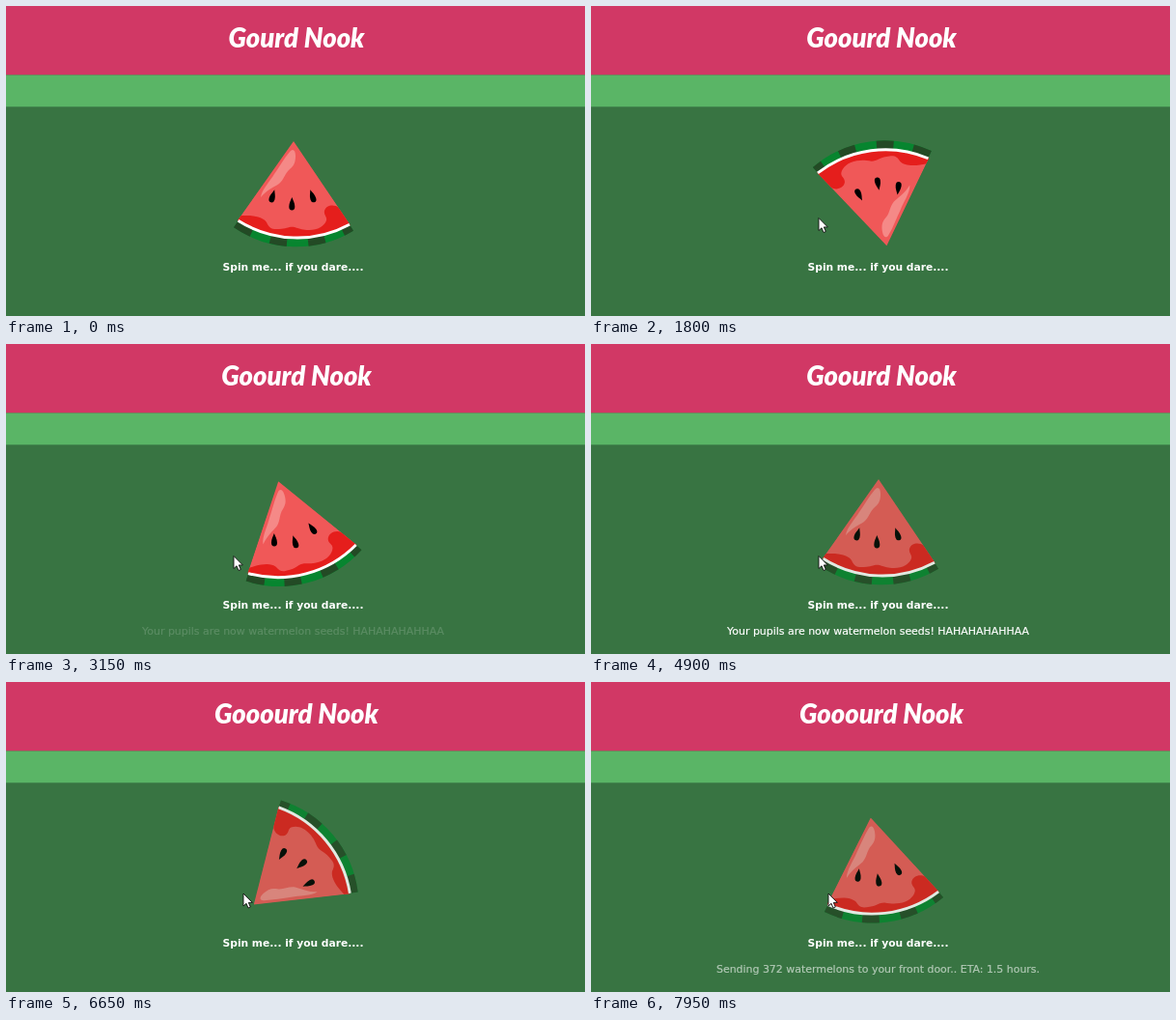
An HTML page that plays this animation: 600x321 px, repeating every 8000 ms.

```html
<!DOCTYPE html>
<html lang="en">
<head>
<meta charset="utf-8">
<title>Spin the slice</title>
<style>
html, body { margin: 0; width: 100%; height: 100%; overflow: hidden; background: #387442; }
svg { display: block; width: 100%; height: 100%; }
text { fill: #fff; text-anchor: middle; font: 10.95px Verdana, "DejaVu Sans", sans-serif; }
#title { font: italic 900 27.4px Lato, sans-serif; }
#label { font-weight: bold; font-size: 10.7px; }
#fortune { stroke: #fff; stroke-width: .2; }
</style>
</head>
<body>
<svg viewBox="0 0 600 321">
  <defs>
    <clipPath id="wedge"><path d="M298 140L240 222A114 114 0 0 0 356.5 226.5Z"/></clipPath>
    <path id="seed" d="M0-7C1-4 3-1 3 2.7A3 3.8 0 0 1-3 2.7C-3-1-1-4 0-7Z"/>
  </defs>
  <rect width="600" height="71.5" fill="#d13865"/>
  <rect y="71.5" width="600" height="32.8" fill="#5ab566"/>
  <text id="title" x="301" y="42.7"></text>

  <g id="slice">
    <g fill="none" stroke-width="9">
      <path d="M238.5 225.5A110 110 0 0 0 357.7 229" stroke="#07852f"/>
      <path d="M238.5 225.5A110 110 0 0 0 357.7 229" stroke="#234a25"
            stroke-dasharray="18.5 20.5 17.5 22 17.5 20 20 90"/>
    </g>
    <g clip-path="url(#wedge)">
      <path d="M298 139L230 236L300 250L366 240Z" fill="#f05858"/>
      <path d="M236 217H250C258 217 267 219 270 224C273 231 276 231 283 231C291 231 293 228 299 229C305 231 308 232 314 232C323 232 330 228 332 222C333 218 329 217 330 212C332 206 340 205 345 209L370 214V250H230Z" fill="#e51e1c"/>
      <path d="M294 151C297 147 300 149 300 155C300 161 299 165 294 169C289 173 288 180 283 184C277 188 271 190 264 198C265 190 274 181 278 174C283 167 288 158 294 151Z" fill="#f58987"/>
    </g>
    <path d="M240.6 222.2A114 114 0 0 0 356 226.2" fill="none" stroke="#fff" stroke-width="2.9"/>
    <use href="#seed" transform="translate(276.3 197) rotate(16)"/>
    <use href="#seed" transform="translate(296.3 205)"/>
    <use href="#seed" transform="translate(317.5 197) rotate(-18)"/>
  </g>

  <text id="label" x="297.5" y="274">Spin me... if you dare....</text>
  <text id="fortune" x="297.5" y="301"></text>
  <path id="cursor" d="M0 0V13L3 10.3L5 15L7.3 14L5.3 9.4H9.3Z" fill="#fff" stroke="#111" stroke-width=".9"/>
</svg>
<script>
const LOOP = 8000, SPIN = 3000, CLICKS = [960, 5547], REVEAL = 2050;
const FORTUNES = [
  "Your pupils are now watermelon seeds! HAHAHAHAHHAA",
  "Sending 372 watermelons to your front door.. ETA: 1.5 hours."
];
// time, x, y
const PATH = [
  [50, 288, 229], [550, 288, 229], [930, 236, 219.5], [4930, 236, 219.5],
  [5060, 284, 230], [5280, 284, 230], [5530, 246, 219]
];
const [title, slice, fortune, cursor] =
  ["title", "slice", "fortune", "cursor"].map(id => document.getElementById(id));

const ramp = (t, start, length) => Math.min(1, Math.max(0, (t - start) / length));

// cubic-bezier(.25, .1, .25, 1)
function ease(x) {
  let lo = 0, hi = 1, s = .5;
  for (let i = 0; i < 25; i++) {
    s = (lo + hi) / 2;
    if (.75 * s * (1 - s) + s ** 3 < x) lo = s; else hi = s;
  }
  return x <= 0 ? 0 : x >= 1 ? 1 : .3 * s * (1 - s) ** 2 + 3 * s * s * (1 - s) + s ** 3;
}
const eased = (t, start, length) => ease(ramp(t, start, length));

function pointer(t) {
  let [, x, y] = PATH[0];
  for (let i = 1; i < PATH.length; i++) {
    const [start] = PATH[i - 1], [end, px, py] = PATH[i];
    const k = eased(t, start, end - start);
    x += (px - x) * k;
    y += (py - y) * k;
  }
  return [x, y];
}

function draw(t) {
  const [first, second] = CLICKS;
  const clicks = CLICKS.filter(c => t >= c).length;
  title.textContent = "G" + "o".repeat(clicks + 1) + "urd Nook";

  const turn = 360 * (eased(t, first, SPIN) + eased(t, second, SPIN));
  slice.setAttribute("transform", `rotate(${turn} 297.7 194.5)`);
  const hover = eased(t, 20, 300) - eased(t, first, 300) + eased(t, 3980, 300);
  slice.setAttribute("opacity", 1 - .15 * hover);

  const next = t >= second + REVEAL;
  fortune.textContent = FORTUNES[+next];
  fortune.setAttribute("opacity", next
    ? eased(t, second + REVEAL, 1000)
    : eased(t, first + REVEAL, 1000) - eased(t, second, 1000));

  cursor.setAttribute("transform", `translate(${pointer(t)})`);
  cursor.setAttribute("visibility", t < 50 ? "hidden" : "visible");
}

const begin = performance.now();
function frame() {
  draw((performance.now() - begin) % LOOP);
  requestAnimationFrame(frame);
}
frame();
</script>
</body>
</html>
```
